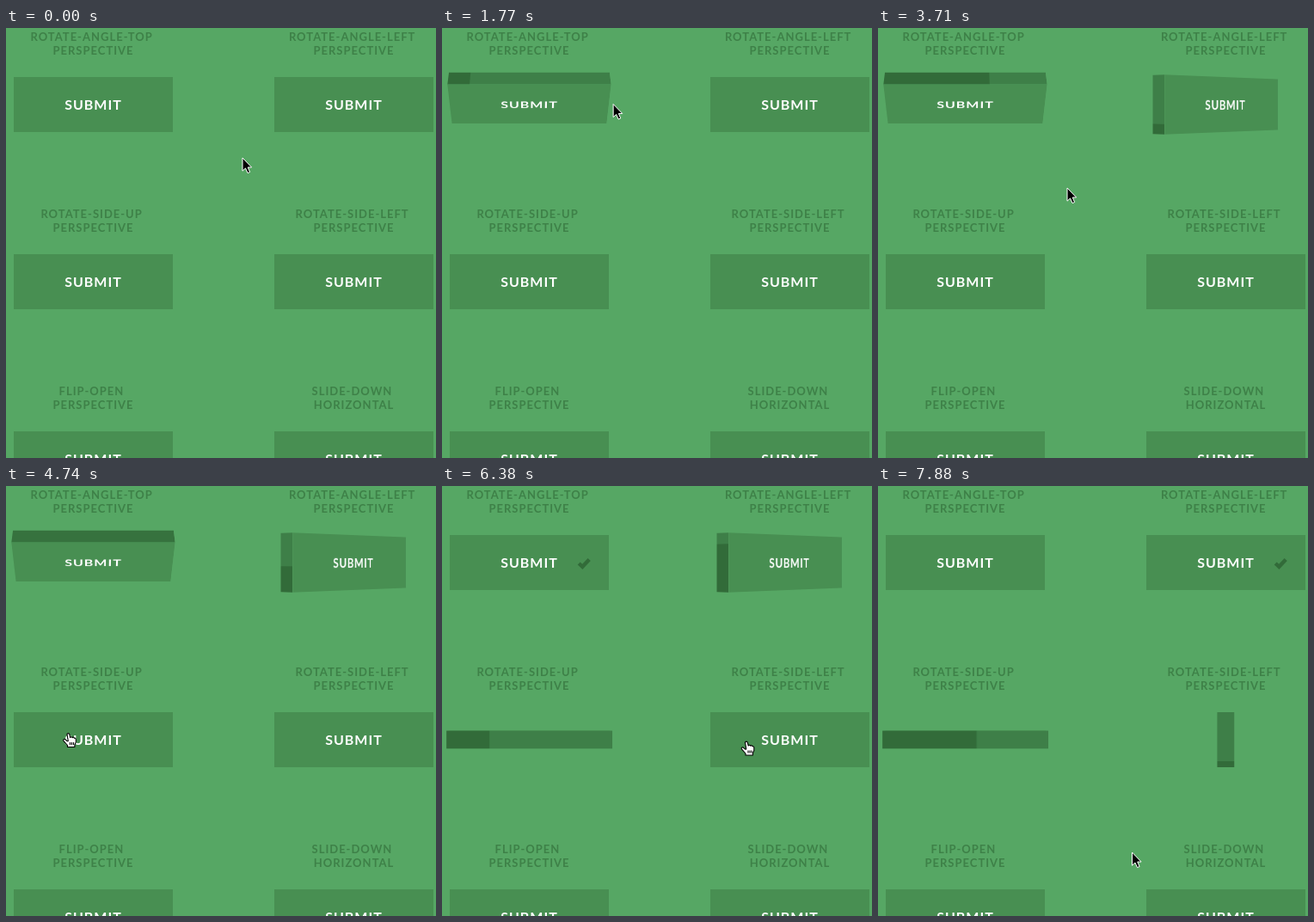
Write an HTML page that moves like this. It is 500 by 500 pixels and loops after 8 s.

```html
<!DOCTYPE html>
<html lang="en">
<head>
<meta charset="utf-8">
<title>Progress buttons</title>
<style>
html, body { margin: 0; width: 100%; height: 100%; overflow: hidden; }
body { position: relative; background: #56a764; font: 700 16px Lato, sans-serif; letter-spacing: 1px; text-align: center; }
.label, .button { position: absolute; width: 185px; }
.label { color: #3e8148; font-size: 13px; line-height: 16px; white-space: pre; }
.button { height: 64px; perspective: 800px; }
.wrap { height: 100%; transform-style: preserve-3d; }
.face { position: absolute; inset: 0; background: #488f52; color: #fff; line-height: 64px; }
.check { position: absolute; left: 148px; top: 25px; opacity: 0; }
.strip { position: absolute; background: #3e7f48; }
.bar { position: absolute; left: 0; bottom: 0; width: 100%; height: 100%; background: #326b39; }
.top, .bottom { left: 0; width: 100%; height: 20px; }
.left, .right { top: 0; width: 20px; height: 100%; }
.top { bottom: 100%; transform-origin: bottom; transform: rotateX(90deg); }
.bottom { top: 100%; transform-origin: top; transform: rotateX(-90deg); }
.left { right: 100%; transform-origin: right; transform: rotateY(-90deg); }
.right { left: 100%; transform-origin: left; transform: rotateY(90deg); }
#cursor { position: absolute; left: 0; top: 0; overflow: visible; }
</style>
</head>
<body>
<svg id="cursor" width="1" height="1">
  <path id="arrow" d="M0 0V15.2L3.5 12L6 17.6L8.6 16.5L6.2 11H10.6Z" fill="#000" stroke="#fff" stroke-width="1"/>
  <path id="hand" d="M-1.5 1.2C-1.5-.3 1-.3 1.3 1.2L2.2 5C2.6 3.8 4.4 4 4.6 5.2C5.2 4.2 6.8 4.6 6.9 5.8C7.8 5.2 8.8 6 8.8 7.2V10.5L7.4 13.6V16H-1V14L-5.6 8.8C-6.4 7.4-4.8 6.2-3.4 7.4L-1.4 9.2L-.2 9Z M2 10.5V13.5M4 10.5V13.5M6 10.5V13.5" fill="#fff" stroke="#000" stroke-width="1.1" stroke-linejoin="round"/>
</svg>
<script>
const LOOP = 8000, TURN = 300, SHOWN = 1500;

// click and back are the starts of the two turns; progress is a list of [time, share]
const buttons = [
  { x: 9, y: 57, label: 'ROTATE-ANGLE-TOP \nPERSPECTIVE', side: 'top', click: 910, back: 4970,
    turn: p => `rotateX(${-45 * p}deg)`,
    progress: [[1200, 0], [2070, .21], [2670, .34], [3710, .65], [4650, 1]] },
  { x: 312, y: 57, label: 'ROTATE-ANGLE-LEFT \nPERSPECTIVE', side: 'left', click: 2780, back: 7260,
    turn: p => `rotateY(${45 * p}deg)`,
    progress: [[3080, 0], [3710, .17], [5190, .55], [6380, .82], [6680, .9], [6960, 1]] },
  { x: 9, y: 263, label: 'ROTATE-SIDE-UP \nPERSPECTIVE', side: 'bottom', click: 4750,
    turn: p => `rotateX(${90 * p}deg) translateZ(${10 * p}px)`,
    progress: [[5230, 0], [5490, .06], [6380, .26], [6680, .29], [7880, .57], [8000, .6]] },
  { x: 312, y: 263, label: 'ROTATE-SIDE-LEFT \nPERSPECTIVE', side: 'right', click: 7130,
    turn: p => `translateZ(${-92.5 * p}px) rotateY(${-90 * p}deg) translateZ(${10 * p}px)`,
    progress: [[7480, 0], [7880, .11], [8000, .14]] },
  { x: 9, y: 469, label: 'FLIP-OPEN \nPERSPECTIVE' },
  { x: 312, y: 469, label: 'SLIDE-DOWN \nHORIZONTAL' }
];

const path = [
  [0, 275, 151], [300, 275, 151], [740, 99.5, 84], [1500, 99.5, 84], [2200, 400, 97.5],
  [3280, 400, 97.5], [3710, 220, 186], [4250, 72.5, 287.5], [5550, 72.5, 287.5],
  [6380, 354, 297], [6600, 385, 299], [7500, 385, 299], [7880, 295.5, 426], [8000, 295.5, 426]
];

const clamp = v => Math.min(1, Math.max(0, v));
const ramp = (t, start) => clamp((t - start) / TURN);

// CSS "ease", cubic-bezier(.25, .1, .25, 1)
function ease(x) {
  const bezier = (a, b, s) => 3 * a * s * (1 - s) ** 2 + 3 * b * s * s * (1 - s) + s ** 3;
  let lo = 0, hi = 1;
  for (let i = 0; i < 20; i++) {
    const mid = (lo + hi) / 2;
    if (bezier(.25, .25, mid) < x) lo = mid; else hi = mid;
  }
  return x <= 0 ? 0 : x >= 1 ? 1 : bezier(.1, 1, lo);
}

function along(points, t) {
  if (t <= points[0][0]) return points[0][1];
  const i = points.findIndex(p => p[0] > t);
  if (i < 0) return points.at(-1)[1];
  const [a, b] = [points[i - 1], points[i]];
  return a[1] + (b[1] - a[1]) * (t - a[0]) / (b[0] - a[0]);
}

// Smooth curve through the path that starts and stops gently at rests
function pathAt(t, axis) {
  const i = Math.max(1, path.findIndex(p => p[0] > t));
  const slope = k => (path[k][axis] - path[k - 1][axis]) / (path[k][0] - path[k - 1][0]);
  const tangent = k => {
    if (k < 1 || k > path.length - 2) return 0;
    const a = slope(k), b = slope(k + 1);
    return a * b > 0 ? 2 * a * b / (a + b) : 0;
  };
  const [a, b] = [path[i - 1], path[i]], d = b[0] - a[0], s = (t - a[0]) / d, r = 1 - s;
  return a[axis] * (1 + 2 * s) * r * r + b[axis] * s * s * (3 - 2 * s)
    + d * s * r * (tangent(i - 1) * r - tangent(i) * s);
}

function add(parent, cls, text = '') {
  const el = document.createElement('div');
  el.className = cls;
  el.textContent = text;
  return parent.appendChild(el);
}

const cursor = document.getElementById('cursor');
const arrow = document.getElementById('arrow');
const hand = document.getElementById('hand');

for (const b of buttons) {
  const label = add(document.body, 'label', b.label);
  const box = add(document.body, 'button');
  label.style.left = box.style.left = b.x + 'px';
  label.style.top = b.y - 55 + 'px';
  box.style.top = b.y + 'px';
  b.wrap = add(box, 'wrap');
  const face = add(b.wrap, 'face', 'SUBMIT');
  if (!b.side) continue;
  b.check = add(face, 'check');
  b.check.innerHTML = '<svg width="17" height="15" style="display:block"><path d="M2.2 8L6.3 11.8L14.2 3.4" fill="none" stroke="#326b39" stroke-width="4.4"/></svg>';
  b.strip = add(b.wrap, 'strip ' + b.side);
  b.bar = add(b.strip, 'bar');
}
document.body.append(cursor);

function drawButton(b, t) {
  const back = b.back ?? Infinity;
  const p = ease(ramp(t, b.click)) - ease(ramp(t, back));
  b.wrap.style.transform = p ? b.turn(p) : 'none';
  b.strip.style.visibility = p ? 'visible' : 'hidden';
  const flat = b.side === 'top' || b.side === 'bottom';
  b.bar.style[flat ? 'width' : 'height'] = along(b.progress, t) * 100 + '%';
  b.bar.style.opacity = 1 - ease(ramp(t, back - TURN));
  b.check.style.opacity = ease(ramp(t, back + TURN)) - ease(ramp(t, back + TURN + SHOWN));
}

function draw(now) {
  const t = now % LOOP;
  const x = pathAt(t, 1), y = pathAt(t, 2);
  const active = buttons.filter(b => b.side);
  active.forEach(b => drawButton(b, t));
  const over = active.some(b => t < b.click && x > b.x && x < b.x + 185 && y > b.y && y < b.y + 64);
  cursor.style.transform = `translate(${x}px, ${y}px)`;
  arrow.style.display = over ? 'none' : '';
  hand.style.display = over ? '' : 'none';
}

let start;
function tick(now) {
  start ??= now;
  draw(now - start);
  requestAnimationFrame(tick);
}
draw(0);
requestAnimationFrame(tick);
</script>
</body>
</html>
```
